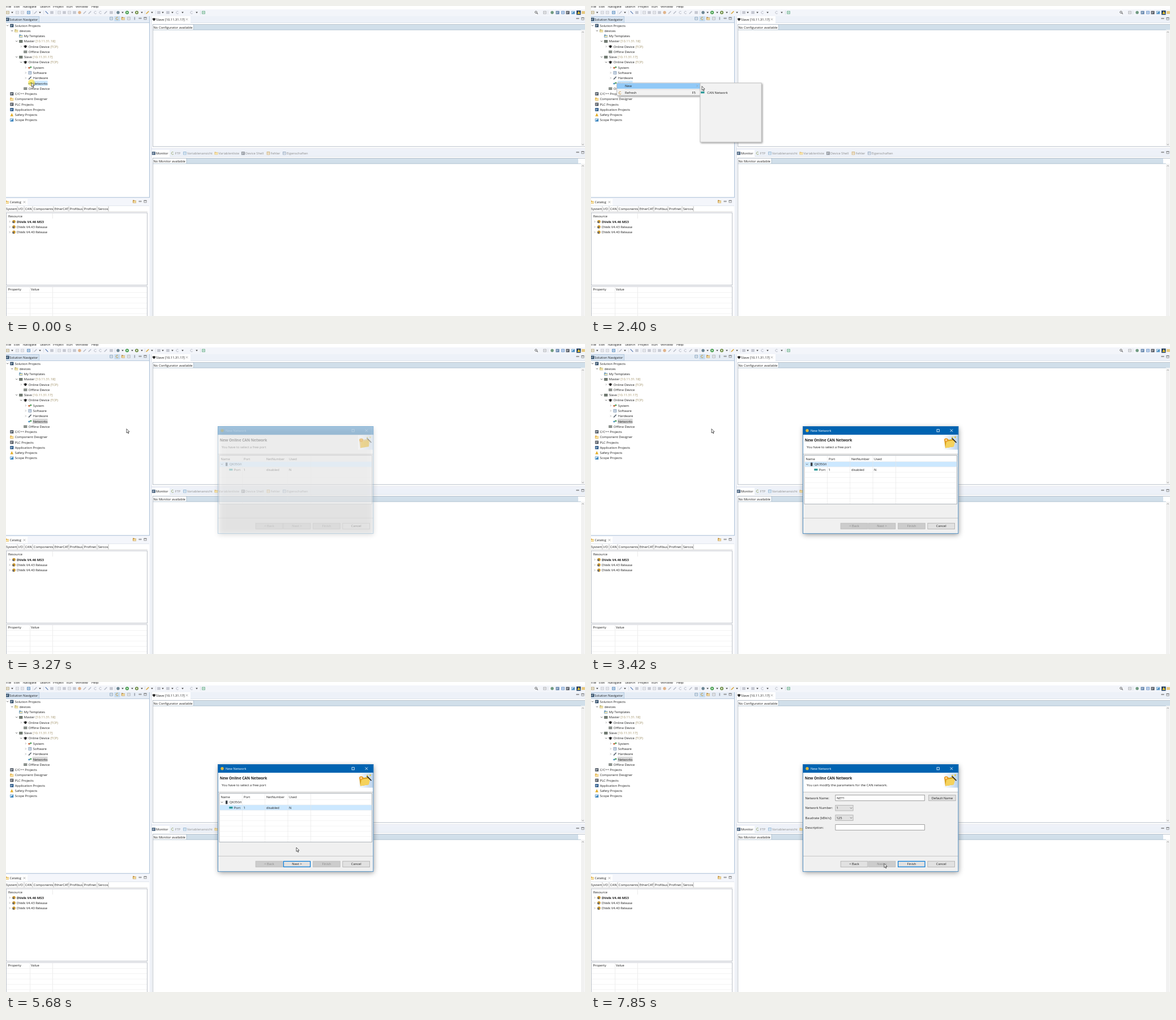
Write an HTML page with a canvas that moves like this. It is 1023x547 px and loops after 8000 ms.

```html
<!DOCTYPE html>
<html lang="en">
<head>
<meta charset="utf-8">
<title>New network</title>
<style>
html, body { margin: 0; width: 100%; height: 100%; overflow: hidden; background: #fff; }
canvas { display: block; }
</style>
</head>
<body>
<canvas id="stage" width="1023" height="547"></canvas>
<script>
const c = document.getElementById('stage').getContext('2d');
const LOOP = 8000;
const INK = '#1c1c1c', DIM = '#8b8b8b', OLIVE = '#98875a', PALE = '#b9bdc8';
const BLUE = '#cce8ff', GREY = '#d9d9d9', BAND = '#d1dfea';

// ---------- basic shapes ----------
function rect(x, y, w, h, fill) { c.fillStyle = fill; c.fillRect(x, y, w, h); }
function frame(x, y, w, h, stroke, lw = 1) {
  c.strokeStyle = stroke; c.lineWidth = lw;
  c.strokeRect(x + lw / 2, y + lw / 2, w - lw, h - lw);
}
function box(x, y, w, h, fill, stroke, lw = 1) { rect(x, y, w, h, fill); frame(x, y, w, h, stroke, lw); }
function poly(points, fill) {
  c.beginPath();
  points.forEach(([x, y]) => c.lineTo(x, y));
  c.closePath();
  c.fillStyle = fill; c.fill();
}
function line(points, stroke, lw = 0.8) {
  c.beginPath();
  points.forEach(([x, y]) => c.lineTo(x, y));
  c.strokeStyle = stroke; c.lineWidth = lw; c.stroke();
}
function dot(x, y, r, fill) { c.beginPath(); c.arc(x, y, r, 0, 7); c.fillStyle = fill; c.fill(); }

// y is the middle of the capitals; drawn scaled down so small type keeps true widths
function text(s, x, y, color = INK, weight = 400, size = 5.8, align = 'left') {
  c.save();
  c.translate(x, y + size * 0.37);
  c.scale(0.1, 0.1);
  c.font = `${weight} ${size * 10}px "Open Sans", "Noto Sans", sans-serif`;
  c.textAlign = align;
  c.fillStyle = color;
  c.fillText(s, 0, 0);
  const w = c.measureText(s).width / 10;
  c.restore();
  return w;
}
function withAlpha(a, draw) {
  if (a <= 0) return;
  c.save(); c.globalAlpha = a; draw(); c.restore();
}
function shadowBox(x, y, w, h, fill, blur, dx, dy) {
  c.save();
  c.shadowColor = 'rgba(0,0,0,.42)'; c.shadowBlur = blur;
  c.shadowOffsetX = dx; c.shadowOffsetY = dy;
  rect(x, y, w, h, fill);
  c.restore();
}

// ---------- icons, centred on x, y ----------
const icons = {
  box(x, y, k) { rect(x - 2.8, y - 2.5, 5.6, 5, k); },
  doc(x, y, k) { box(x - 2.7, y - 2.7, 5.4, 5.4, '#fff', k, 0.9); rect(x - 1.5, y - 0.6, 3, 0.9, k); },
  dot(x, y, k) { dot(x, y, 2.7, k); },
  down(x, y) { poly([[x - 1.8, y - 0.9], [x + 1.8, y - 0.9], [x, y + 1.2]], '#333'); },
  pen(x, y, k) { line([[x - 2.3, y + 2.3], [x + 2.3, y - 2.3]], k, 1.6); },
  slash(x, y, k) { line([[x - 2.3, y - 2.3], [x + 2.3, y + 2.3]], k, 1.2); },
  loop(x, y, k) { c.beginPath(); c.arc(x, y, 2.2, 0.6, 5.4); c.strokeStyle = k; c.lineWidth = 1; c.stroke(); },
  run(x, y, k) { dot(x, y, 3, k); poly([[x - 1, y - 1.6], [x - 1, y + 1.6], [x + 1.8, y]], '#fff'); },
  folder(x, y, k) {
    poly([[x - 3, y - 2.4], [x - 0.6, y - 2.4], [x, y - 1.5], [x + 3, y - 1.5], [x + 3, y + 2.5], [x - 3, y + 2.5]], k);
    rect(x - 2.2, y - 0.6, 5, 2.4, '#fbe9b0');
  },
  cap(x, y, k) {
    poly([[x - 3.6, y - 0.6], [x, y - 2.6], [x + 3.6, y - 0.6], [x, y + 1.3]], k);
    rect(x - 1.7, y + 0.4, 3.4, 1.8, k);
  },
  rack(x, y, k) {
    rect(x - 3.1, y - 2.2, 6.2, 4.6, k);
    for (let i = -1; i < 2; i++) rect(x + i * 1.9 - 0.5, y - 1.6, 0.8, 3.2, '#a9b0a6');
  },
  tag(x, y, k) { rect(x - 3, y - 2.7, 6, 5.6, k); rect(x - 2, y - 1, 3.6, 0.9, '#fff'); rect(x - 2, y + 0.8, 2.4, 0.8, '#cfd8e0'); },
  net(x, y, k) { rect(x - 3, y - 0.6, 3.4, 2.4, k); rect(x - 0.3, y - 1.8, 3.4, 2.4, '#5fa86a'); },
  chart(x, y, k) { box(x - 3, y - 2.6, 6, 5.4, '#eef4fa', k, 0.7); poly([[x - 2.4, y + 2], [x - 0.4, y - 0.4], [x + 2.4, y - 1.4], [x + 2.4, y + 2]], k); },
  warn(x, y, k) { poly([[x - 2.8, y + 2.6], [x, y - 2.8], [x + 2.8, y + 2.6]], k); },
  find(x, y, k) { c.beginPath(); c.arc(x - 0.6, y - 0.6, 1.8, 0, 7); c.strokeStyle = k; c.lineWidth = 0.9; c.stroke(); line([[x + 0.7, y + 0.7], [x + 2.6, y + 2.6]], k, 1.1); },
  min(x, y, k) { frame(x - 2.4, y - 1.3, 4.8, 1.9, k, 0.7); },
  max(x, y, k) { frame(x - 2.4, y - 2.2, 4.8, 4.4, k, 0.7); rect(x - 2.4, y - 2.2, 4.8, 1.2, k); },
  close(x, y, k) { line([[x - 1.8, y - 1.8], [x + 1.8, y + 1.8]], k); line([[x - 1.8, y + 1.8], [x + 1.8, y - 1.8]], k); },
  base(x, y) { dot(x, y, 2.8, '#c8962e'); rect(x - 2.4, y - 0.3, 2.4, 2.6, '#4b5a78'); }
};
function icon(kind, x, y, color = '#6d7480') { icons[kind](x, y, color); }

function twist(x, y, open) {
  line(open ? [[x - 1.5, y - 0.9], [x, y + 0.7], [x + 1.5, y - 0.9]]
            : [[x - 0.7, y - 1.5], [x + 0.8, y], [x - 0.7, y + 1.5]], open ? '#444' : '#9a9a9a', 0.8);
}

// ---------- main window ----------
function menuBar() {
  rect(0, 0, 1023, 18, '#f3f5fa');
  rect(0, 0, 1023, 6, '#fff');
  [['File', 0], ['Edit', 14], ['Navigate', 30], ['Search', 60], ['Project', 83],
   ['Run', 107], ['Window', 123], ['Help', 151]].forEach(([s, x]) => text(s, x, 1));

  [11, 60, 206, 223, 240, 258, 277, 294, 312, 337].forEach(x => icon('down', x, 11.5));
  [20, 29, 94, 112].forEach(x => icon('doc', x, 11.5, PALE));
  [81, 103, 121, 186, 270, 286].forEach(x => icon('box', x, 11.5, '#c6c9d2'));
  [52, 139, 148, 176].forEach(x => icon('pen', x, 11.5, PALE));
  [158, 167, 303, 328].forEach(x => icon('loop', x, 11.5, PALE));
  [['doc', 3, '#b0a070'], ['doc', 40, '#3c79b4'], ['slash', 72, '#5577b0'], ['dot', 130, '#e0b48c'],
   ['dot', 198, '#6d8794'], ['run', 214, '#3f9b46'], ['run', 231, '#6f8f45'], ['pen', 250, '#d9a63a'],
   ['doc', 349, '#57a57f'], ['find', 937, '#555'], ['doc', 952, '#a5a9b0'], ['dot', 965, '#6f9a80'],
   ['tag', 974.5, '#5b7ea8'], ['doc', 984, '#4d7fc0'], ['tag', 992.5, '#4a4f58'], ['chart', 1002, '#3f86bd'],
   ['box', 1020, '#e7c87c']].forEach(([k, x, col]) => icon(k, x, 11.5, col));
  rect(1008, 8, 7.5, 7.5, '#1f3f66');
  icon('warn', 1012, 11.5, '#e9c431');
  [47, 66, 88, 192, 245, 264, 343, 957].forEach(x => rect(x, 8, 0.6, 7, '#cfd3dc'));
}

const tree = [
  ['Solution Projects', 0, 'tag', '#24425f', 1], ['devices', 1, 'folder', '#b8b06a', 1],
  ['My Templates', 2, 'folder', '#4c88b5'], ['Master', 2, 'rack', '#4a554c', 1, '[10.11.31.18]'],
  ['Online Device', 3, 'cap', '#222', 0, '(TCP)'], ['Offline Device', 3, 'rack', '#777d7a'],
  ['Slave', 2, 'rack', '#4a554c', 1, '[10.11.31.17]'], ['Online Device', 3, 'cap', '#222', 1, '(TCP)'],
  ['System', 4, 'net', '#c8643c', 0], ['Software', 4, 'doc', '#6f8db0', 0],
  ['Hardware', 4, 'pen', '#59636e', 0], ['Networks', 4, 'net', '#4f94c4'],
  ['Offline Device', 3, 'rack', '#777d7a'], ['C/C++ Projects', 0, 'tag', '#46505c'],
  ['Component Designer', 0, 'folder', '#dfa52c'], ['PLC Projects', 0, 'tag', '#4a4f58'],
  ['Application Projects', 0, 'tag', '#1d4f83'], ['Safety Projects', 0, 'warn', '#e3ad27'],
  ['Scope Projects', 0, 'chart', '#3280bc']
];
function navigator(active) {
  rect(0, 18, 254, 11.5, '#e6edf6');
  rect(0, 18, 59, 11.5, '#d6e3f1');
  frame(-2, 18, 61, 12, '#a9bfd6', 0.7);
  icon('tag', 2.5, 23.5, '#24425f');
  text('Solution Navigator', 6.3, 23.5);
  rect(191.5, 18, 10, 9, '#c5dcf1');
  [['doc', 186, '#7a99b8'], ['loop', 196.5, '#c89a3b'], ['folder', 207, '#b98b43'], ['doc', 217, '#a5aab2'],
   ['min', 237, '#777'], ['max', 246, '#777']].forEach(([k, x, col]) => icon(k, x, 22, col));
  rect(226.5, 19.5, 1.6, 5, '#9aa0aa');
  rect(0, 29.5, 253, 308, '#fff');
  rect(0, 29, 254, 0.8, '#a9bfd6');
  rect(253, 18, 1, 320, '#a9bfd6');
  rect(0, 337.3, 254, 1, '#a9bfd6');
  tree.forEach(([name, depth, kind, color, open, note], i) => {
    const y = 34.5 + 9.26 * i, x = 10.3 + depth * 8;
    if (name === 'Networks') rect(47, y - 4.6, 26.5, 9.2, active ? BLUE : GREY);
    if (open !== undefined) twist(x - 7.6, y, open);
    icon(kind, x, y, color);
    const w = text(name, x + 5.4, y);
    if (note) text(note, x + 7 + w, y, OLIVE);
  });
}

function catalog() {
  rect(0, 339, 254, 208, '#f4f6fb');
  rect(0, 340, 38, 12, '#fff');
  icon('folder', 2, 346, '#d8a336');
  text('Catalog', 6.5, 346);
  icon('close', 32.5, 346, '#999');
  icon('folder', 227, 345, '#c08a34'); icon('min', 237, 345, '#777'); icon('max', 246, 345, '#777');
  rect(0, 352, 253, 195, '#fff');
  rect(0, 352, 253, 0.7, '#d5dbe6');
  rect(0, 362.5, 250, 0.7, '#c9c9c9');
  const edges = [20, 32, 47, 84, 111, 136, 161, 181];
  ['System', 'I/O', 'CAN', 'Components', 'EtherCAT', 'Profibus', 'Profinet', 'Sercos'].forEach((s, i) => {
    text(s, i ? edges[i - 1] + 1.8 : 0, 357.5);
    rect(edges[i] - 0.4, 353.5, 0.8, 9, '#a8a8a8');
  });
  frame(0, 364.5, 250, 128.5, '#b5bac2', 0.9);
  text('Resource', 4, 371);
  rect(82, 366, 0.6, 9, '#dedede');
  ['V4.46 MS3', 'V4.43 Release', 'V4.40 Release'].forEach((v, i) => {
    const y = 380.5 + 9.3 * i;
    twist(6.5, y, false);
    icon('base', 14, y);
    text('DVelk ' + v, 19, y, INK, i ? 400 : 700, i ? 5.8 : 5.9);
  });
  frame(0, 494.5, 250, 60, '#b5bac2', 0.9);
  text('Property', 3.5, 500.3);
  text('Value', 44, 500.3);
  [42, 82].forEach(x => rect(x, 496, 0.6, 51, '#e2e2e2'));
  for (let y = 505; y < 547; y += 9.4) rect(1, y, 248, 0.6, '#ececec');
}

function viewBox(y, bottom, label, split) {
  box(259, y, 765, bottom - y, '#fff', '#aeb7c2', 0.9);
  rect(split, y + 0.8, 692, 9.4, BAND);
  rect(259.8, y + 9.7, 756, 0.8, '#a6bac9');
  rect(split - 0.4, y, 0.8, 10, '#a6bac9');
  text(label, 260.5, y + 5.4);
  rect(1016, y + 10.5, 6.4, bottom - y - 11.5, '#f1f1f1');
  line([[1017.5, y + 15], [1019.2, y + 13.3], [1021, y + 15]], '#8a8a8a');
  line([[1017.5, bottom - 5], [1019.2, bottom - 3.3], [1021, bottom - 5]], '#8a8a8a');
}
function editors() {
  rect(254, 18, 769, 529, '#f4f6fb');
  rect(257, 18, 766, 11.5, '#edf1f8');
  rect(257, 18, 69, 12, '#fff');
  rect(257, 29.5, 766, 222, '#fff');
  rect(326, 29, 697, 0.7, '#d3dae6');
  rect(256.5, 18, 0.8, 234, '#ccd5e2');
  icon('cap', 261.5, 23.5, '#222');
  text('Slave [10.11.31.17]', 265.2, 23.5);
  icon('close', 319.5, 23.5, '#999');
  icon('min', 1010, 22.5, '#777'); icon('max', 1019, 22.5, '#777');
  viewBox(32, 248.5, 'No Configurator available', 331.5);

  rect(257, 251.5, 766, 0.8, '#d3dae6');
  rect(257, 254, 766, 11.5, '#edf1f8');
  rect(257, 254, 32, 12, '#fff');
  rect(257, 265.5, 766, 282, '#fff');
  rect(289, 265, 734, 0.7, '#d3dae6');
  rect(256.5, 252, 0.8, 295, '#ccd5e2');
  [['Monitor', 265, 'tag', '#3f5a78'], ['FTP', 298.5, 'loop', '#a0b07a'], ['Variablenansicht', 320, 'doc', '#86aed0'],
   ['Variablenliste', 375.5, 'folder', '#e3c078'], ['Device Shell', 423, 'tag', '#8f949c'],
   ['Fehler', 467.5, 'doc', '#c9a86c'], ['Eigenschaften', 495.8, 'doc', '#8ea4bd']].forEach(([s, x, k, col], i) => {
    icon(k, x - 4.1, 259.8, col);
    text(s, x, 259.8, i ? DIM : INK);
  });
  icon('min', 1010, 258.5, '#777'); icon('max', 1019, 258.5, '#777');
  viewBox(268, 552, 'No Monitor available', 319);
}

// ---------- menus ----------
function canItem(hot) {
  if (hot) rect(193.5, 148, 107, 9.2, '#91c9f7');
  rect(194, 150.8, 6.4, 3.4, '#2f9a9a');
  text('CAN Network', 205.3, 152.6);
}
function contextMenu(hot) {
  shadowBox(45, 135.5, 149, 22.8, '#f2f2f2', 3, 1.5, 1.5);
  frame(45, 135.5, 149, 22.8, '#b4b4b4', 0.8);
  if (hot) rect(46, 136.3, 147, 9.6, '#91c9f7');
  rect(60, 147, 132, 0.6, '#d2d2d2');
  text('New', 60, 141.2);
  twist(187.5, 141, false);
  icon('loop', 51.5, 153.3, '#c99a4a');
  text('Refresh', 60, 153.3);
  text('F5', 178.5, 153.3);
}
function subMenu(hot) {
  shadowBox(192.5, 135.5, 109, 105, '#f2f2f2', 3, 1.5, 1.5);
  frame(192.5, 135.5, 109, 105, '#b4b4b4', 0.8);
  canItem(hot);
}

// ---------- dialog ----------
function button(label, x, y, w, h, state) {
  const [fill, edge, ink, lw] = {
    off: ['#cccccc', '#bfbfbf', '#8a8a8a', 0.8], on: ['#e1e1e1', '#adadad', INK, 0.8],
    main: ['#e1e1e1', '#0078d7', INK, 1.2], hover: ['#e5f1fb', '#0078d7', INK, 1],
    down: ['#cce4f7', '#005499', INK, 1]
  }[state];
  box(x, y, w, h, fill, edge, lw);
  text(label, x + w / 2, y + h / 2, ink, 400, 5.8, 'center');
}
function portPage(s) {
  box(376.5, 196.3, 270.5, 86.4, '#fff', '#9aa0a8', 0.8);
  const row = i => 207.6 + 9.3 * i;
  if (s.hover) rect(377.3, row(1), 269, 9.3, '#e5f3ff');
  rect(377.3, row(s.picked), 269, 9.3, s.blurred ? GREY : BLUE);
  for (let i = 0; i < 8; i++) rect(377.3, row(i) - 0.3, 269, 0.6, '#ebebeb');
  [417, 457.5, 497.7, 538].forEach(x => rect(x, 197, 0.6, 85, '#e4e4e4'));
  [['Name', 379.5], ['Port', 420], ['NetNumber', 460], ['Used', 500]].forEach(([h, x]) => text(h, x, 202.9));
  twist(381.5, 212.3, true);
  rect(388, 209.3, 3.4, 6, '#3a3f46');
  c.save();
  c.beginPath(); c.rect(377, 207, 40, 10); c.clip();
  text('QK350/i', 394.7, 212.3);
  c.restore();
  rect(394.3, 220, 6.2, 3.4, '#2f9a9a');
  [['Port', 402.8], ['1', 419.5], ['disabled', 460], ['N', 500]].forEach(([v, x]) => text(v, x, 221.8));
}
function combo(value, y) {
  box(431.5, y, 32, 10.4, '#e1e1e1', '#adadad', 0.8);
  text(value, 433.5, y + 5.2);
  line([[457.8, y + 4.4], [459.6, y + 6.2], [461.4, y + 4.4]], '#555', 0.7);
}
function paramPage() {
  [['Network Name:', 204.5], ['Network Number:', 222.3], ['Baudrate [kBit/s]:', 239.6], ['Description:', 256.5]]
    .forEach(([s, y]) => text(s, 378.5, y));
  box(431.5, 199, 158.3, 10.8, '#fff', '#8a8a8a', 0.8);
  text('NET1', 434.3, 204.5);
  button('Default Name', 596.3, 199, 48.3, 10.8, 'on');
  combo('1', 217.1);
  combo('125', 234.4);
  box(431.5, 251.2, 158.3, 10.5, '#fff', '#8a8a8a', 0.8);
}
function dialog(s) {
  shadowBox(374, 145, 275.3, 189.7, '#f0f0f0', 9, 1, 2.5);
  rect(374, 145, 275.3, 15.3, '#0063b1');
  icon('dot', 382, 152.7, '#e0b73c');
  text('New Network', 388, 152.7, '#fff');
  frame(610.7, 150.3, 5, 5, '#fff', 0.8);
  line([[634.6, 150.4], [639.2, 155]], '#fff'); line([[634.6, 155], [639.2, 150.4]], '#fff');
  rect(374.6, 160.3, 274, 33.7, '#fff');
  rect(374.6, 193.8, 274, 0.8, '#b5b5b5');
  text('New Online CAN Network', 377.7, 169.2, INK, 700, 6.5);
  text(s.second ? 'You can modify the parameters for the CAN network.' : 'You have to select a free port', 381, 182);

  const g = c.createLinearGradient(622, 0, 648, 0);
  g.addColorStop(0, '#fff'); g.addColorStop(1, '#bcd3ec');
  rect(622, 161, 26.5, 25.5, g);
  poly([[624, 168], [630, 167], [632, 169], [641, 167.5], [641, 181], [626, 183.5]], '#d9a31f');
  poly([[626, 183.5], [628, 172], [644, 169.5], [641, 181]], '#f5d25c');
  dot(627.5, 169.5, 3.2, '#ee9a2c');
  dot(627.5, 169.5, 1.5, '#fbe6a0');
  line([[637.5, 166], [645.5, 174]], '#222', 1.7);
  dot(638.5, 165, 1.3, '#e6c83a'); dot(643.5, 164.5, 1.4, '#e6c83a');

  if (s.second) paramPage(); else portPage(s);
  rect(374.6, 306.8, 274, 0.8, '#bcbcbc');
  button('< Back', 440.8, 315.8, 48.4, 11, s.second ? 'on' : 'off');
  button('Next >', 489.8, 315.8, 48.4, 11, s.next);
  button('Finish', 542, 315.8, 48.6, 11, s.second ? 'main' : 'off');
  button('Cancel', 594.5, 315.8, 48.5, 11, 'on');
  frame(374, 145, 275.3, 189.7, '#2c78b8', 0.8);
}

// ---------- motion ----------
// progress in n jumps, the first at a and the last at b
function steps(t, a, b, n) {
  if (t < a) return 0;
  return Math.min(1, (Math.floor((t - a) / (b - a) * (n - 1) + 1e-6) + 1) / n);
}
const ease = p => p * p * (3 - 2 * p);

// start, end, jumps, x, y
const moves = [
  [1240, 1410, 3, 71, 139.4], [1550, 1551, 1, 71, 140], [1860, 2340, 7, 196, 141.5],
  [2420, 2570, 3, 212.5, 149], [2650, 2651, 1, 213, 149.7], [3970, 4750, 11, 419, 218.3],
  [4830, 4831, 1, 419.3, 219.3], [5290, 5680, 6, 513, 292], [5840, 6390, 8, 517.3, 320],
  [7780, 7850, 2, 518, 320.3]
];
function pointer(t) {
  let x = 45, y = 135.3;
  for (const [a, b, n, nx, ny] of moves) {
    const p = n === 1 ? +(t >= a) : ease(steps(t, a, b, n));
    x += (nx - x) * p;
    y += (ny - y) * p;
  }
  return [x, y];
}
const clicks = [[0, 170], [2880, 3030], [5060, 5210], [6540, 6690]];

function arrow(x, y) {
  c.save();
  c.translate(x, y); c.scale(0.45, 0.45);
  c.lineJoin = 'round';
  const shape = [[0, 0], [0, 16], [3.7, 12.6], [6.3, 18.4], [8.8, 17.3], [6.3, 11.6], [11.3, 11.3]];
  poly(shape, '#fff');
  c.strokeStyle = '#111'; c.lineWidth = 1.5; c.stroke();
  c.restore();
}

function draw(t) {
  const [x, y] = pointer(t);
  const pressed = clicks.some(([a, b]) => t >= a && t < b);
  rect(0, 0, 1023, 547, '#f4f6fb');
  menuBar();
  editors();
  navigator(t < 3030);
  catalog();

  const leave = 1 - steps(t, 3030, 3120, 2);
  withAlpha(steps(t, 940, 1090, 3) * leave, () => contextMenu(t >= 1320));
  withAlpha(steps(t, 1860, 2010, 3) * leave, () => subMenu(y > 148));
  if (t >= 3120 && t < 3190) withAlpha(0.55, () => canItem(true));

  const second = t >= 6770;
  let next = 'off';
  if (t >= 5140 && !second) next = t >= 6540 && pressed ? 'down' : y > 316 ? 'hover' : 'main';
  withAlpha(steps(t, 3270, 3420, 3), () => dialog({
    second, next,
    picked: t < 5140 ? 0 : 1,
    blurred: t >= 6620,
    hover: x > 377 && y > 217 && y < 226
  }));

  if (pressed) dot(x, y, 6, 'rgba(250,222,50,.62)');
  arrow(x, y);
}

function tick() {
  draw(performance.now() % LOOP);
  requestAnimationFrame(tick);
}
tick();
</script>
</body>
</html>
```
